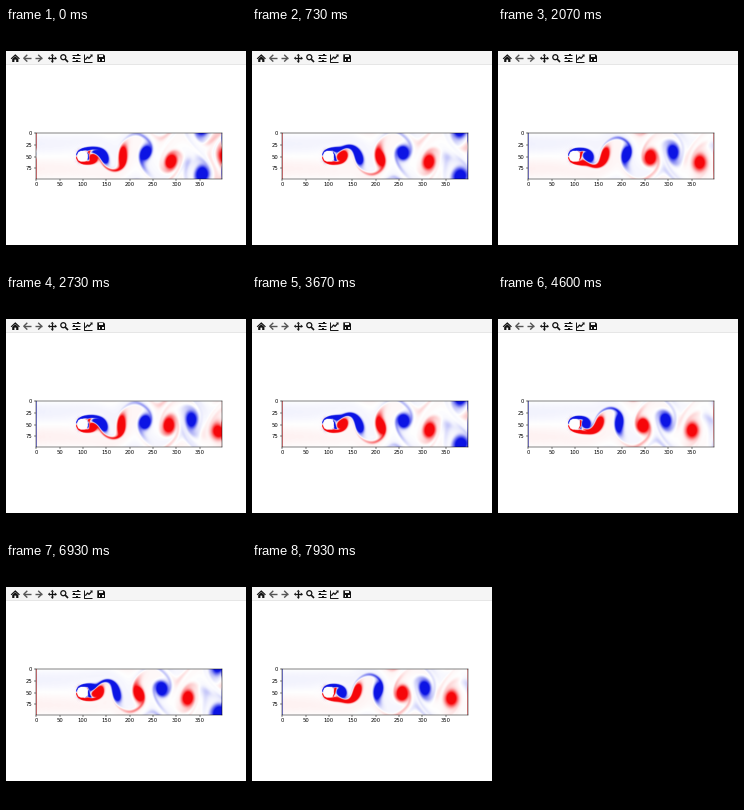
Animation of 240 by 240 pixels, one loop 8000 ms. Source, as a matplotlib script:

```python
import numpy as np
import matplotlib.pyplot as plt
from matplotlib.animation import FuncAnimation
from matplotlib.colors import LinearSegmentedColormap
from matplotlib.patches import Circle, Polygon, Rectangle

SIZE, DPI = 240, 100
COUNT, LOOP = 120, 8000
SHED_MS = 2965            # one shedding cycle on screen

# ---- lattice Boltzmann flow past a cylinder (D2Q9) ----
NX, NY = 400, 100
N = NX * NY
TAU, SPEED = 0.53, 0.126
STEPS, START, EVERY = 5000, 2600, 20
CX = [0, 0, 1, 1, 1, 0, -1, -1, -1]
CY = [0, 1, 1, 0, -1, -1, -1, 0, 1]
WT = [4 / 9] + [1 / 9, 1 / 36] * 4
OPP = [0, 5, 6, 7, 8, 1, 2, 3, 4]
OMEGA = 1 / TAU

yy, xx = np.mgrid[0:NY, 0:NX].astype(np.float32)
solid = np.flatnonzero(np.hypot(xx - NX // 4, yy - NY // 2) < 13)


def relax(pop, rho, ux, uy):
    """Pull the populations to equilibrium, in place."""
    pop *= 1 - OMEGA
    base = rho - 1.5 * rho * (ux * ux + uy * uy)
    pop[0] += OMEGA * WT[0] * base
    for i, cu in ((1, uy), (2, ux + uy), (3, ux), (4, ux - uy)):
        odd = rho * cu
        odd *= 3
        even = odd * cu
        even *= 1.5
        even += base
        odd *= OMEGA * WT[i]
        even *= OMEGA * WT[i]
        pop[i] += even
        pop[i] += odd
        pop[i + 4] += even
        pop[i + 4] -= odd


def start_flow():
    """Uniform stream with a rough vortex street in the wake."""
    ux = np.full((NY, NX), SPEED, np.float32)
    uy = np.zeros((NY, NX), np.float32)
    for k in range(5):
        side = 1 if k % 2 else -1
        dx, dy = xx - (150 + 56 * k), yy - (50 + 9 * side)
        swirl = 0.005 * side * np.exp(-(dx ** 2 + dy ** 2) / 392)
        ux += swirl * dy
        uy -= swirl * dx
    pop = np.zeros((9, N), np.float32)
    relax(pop, np.ones(N, np.float32), ux.ravel(), uy.ravel())
    pop /= OMEGA
    return pop


def vorticity(ux, uy):
    u, v = ux.reshape(NY, NX), uy.reshape(NY, NX)
    return u[2:, 1:-1] - u[:-2, 1:-1] - v[1:-1, 2:] + v[1:-1, :-2]


def simulate():
    pop, new = start_flow(), np.empty((9, N), np.float32)
    kept = []
    for n in range(STEPS):
        grid = pop.reshape(9, NY, NX)
        grid[6:9, :, -1] = grid[6:9, :, -2]
        grid[2:5, :, 0] = grid[2:5, :, 1]
        for i in range(9):
            s = (CY[i] * NX + CX[i]) % N
            new[i, s:] = pop[i, :N - s]
            new[i, :s] = pop[i, N - s:]
        bounced = new[:, solid][OPP]
        east, west = new[2] + new[3] + new[4], new[6] + new[7] + new[8]
        rho = east + west
        rho += new[0]
        rho += new[1]
        rho += new[5]
        ux = east - west
        ux /= rho
        uy = new[1] + new[2]
        uy += new[8]
        uy -= new[4]
        uy -= new[5]
        uy -= new[6]
        uy /= rho
        new[:, solid] = bounced
        ux[solid] = 0
        uy[solid] = 0
        if n >= START and n % EVERY == 0:
            kept.append(vorticity(ux, uy))
        relax(new, rho, ux, uy)
        pop, new = new, pop
    return np.array(kept)


def refine(s, k):
    """Parabolic estimate of a minimum near index k."""
    if k < 1 or k > len(s) - 2:
        return float(k)
    bend = s[k - 1] - 2 * s[k] + s[k + 1]
    return k + (0.5 * (s[k - 1] - s[k + 1]) / bend if bend > 0 else 0)


curls = simulate()
last = len(curls) - 1

# Blue vortices passing one column give the phase and the period.
passing = curls[:, 10:88, 230:241].mean(axis=(1, 2))
late = last - 57 + int(np.argmin(passing[-58:]))
low = max(0, late - 72)
early = low + int(np.argmin(passing[low:late - 41]))
crest = refine(passing, late)
period = crest - refine(passing, early)
limit = 0.62 * np.percentile(np.abs(curls[-55:, 15:85, 250:390]), 99.5)


def field(ms):
    at = last - (last - crest - period * ms / SHED_MS) % period
    k = min(int(at), last - 1)
    mix = at - k
    return (1 - mix) * curls[k] + mix * curls[k + 1]


# ---- window ----
INK, BAR = "#111111", "#f5f5f5"
fig = plt.figure(figsize=(SIZE / DPI, SIZE / DPI), dpi=DPI, facecolor="white")
win = fig.add_axes([0, 0, 1, 1])
win.set(xlim=(0, SIZE), ylim=(SIZE, 0))
win.axis("off")


def box(x, y, w, h, color):
    win.add_patch(Rectangle((x, y), w, h, fc=color, lw=0))


def line(xs, ys, color=INK, lw=0.8):
    win.plot(xs, ys, color=color, lw=lw, solid_capstyle="butt")


def shape(points):
    win.add_patch(Polygon(points, fc=INK, lw=0))


box(0, 0, 240, 23, "black")
box(0, 217, 240, 23, "black")
box(0, 23, 240, 13, BAR)
box(0, 36, 240, 0.7, "#e6e6e6")

# home
shape([(4.7, 30.5), (9.3, 26.2), (13.9, 30.5), (13, 31.2), (9.3, 27.9), (5.6, 31.2)])
shape([(6.2, 31), (9.3, 28.3), (12.4, 31), (12.4, 34), (10.2, 34), (10.2, 31.6),
       (8.4, 31.6), (8.4, 34), (6.2, 34)])
# back and forward
for x, d in ((21, 1), (32.5, -1)):
    line([x - 3.2 * d, x + 3.6 * d], [30.2, 30.2], "#555555", 1)
    line([x + 0.3 * d, x - 3.2 * d, x + 0.3 * d], [26.8, 30.2, 33.6], "#555555", 1)
# pan
line([42.6, 50], [30.2, 30.2], lw=0.9)
line([46.3, 46.3], [26.5, 33.9], lw=0.9)
for dx, dy in ((1, 0), (-1, 0), (0, 1), (0, -1)):
    tip = np.array([46.3 + 4.4 * dx, 30.2 + 4.4 * dy])
    base = tip - 1.9 * np.array([dx, dy])
    side = 1.7 * np.array([dy, dx])
    shape([tip, base + side, base - side])
# zoom
win.add_patch(Circle((57.3, 29.2), 2.5, fill=False, ec=INK, lw=0.9))
line([59.2, 62], [31.1, 34], lw=1.2)
# sliders
for y, knob in ((27.3, 71.8), (30.2, 68), (33.1, 70.8)):
    line([65.8, 74.2], [y, y], lw=0.7)
    box(knob - 0.8, y - 1.2, 1.6, 2.4, INK)
# chart
line([78, 78, 86.4], [26.4, 33.8, 33.8], lw=0.7)
line([79.3, 81.6, 83, 85.8], [31.7, 29, 30.4, 27.3], lw=0.9)
shape([(84, 26.6), (86.6, 26.4), (86.4, 29)])
# save
shape([(91.3, 26.4), (97.6, 26.4), (99, 27.8), (99, 34), (91.3, 34)])
box(92.6, 27.3, 3.9, 1.7, BAR)
box(92.5, 30.6, 5.3, 2.5, BAR)
box(94.2, 31.1, 1.9, 1.6, INK)

# ---- plot ----
cmap = LinearSegmentedColormap.from_list("flow", ["#0c14e4", "#ffffff", "#f6060a"])
left, top, width, height = 30, 104.9, 186, 45.8
ax = fig.add_axes([left / SIZE, 1 - (top + height) / SIZE, width / SIZE, height / SIZE])
img = ax.imshow(field(0), cmap=cmap, vmin=-limit, vmax=limit, aspect="auto",
                interpolation="antialiased", interpolation_stage="rgba")
ax.set_xticks(range(0, 400, 50))
ax.set_yticks(range(0, 100, 25))
ax.tick_params(length=1.3, width=0.35, pad=1.3, labelsize=3.75)
for spine in ax.spines.values():
    spine.set_linewidth(0.35)


def draw(i):
    img.set_data(field(i * LOOP / COUNT))
    return [img]


anim = FuncAnimation(fig, draw, frames=COUNT, interval=LOOP / COUNT,
                     init_func=lambda: draw(0), repeat=True, repeat_delay=0)
plt.show()
```
